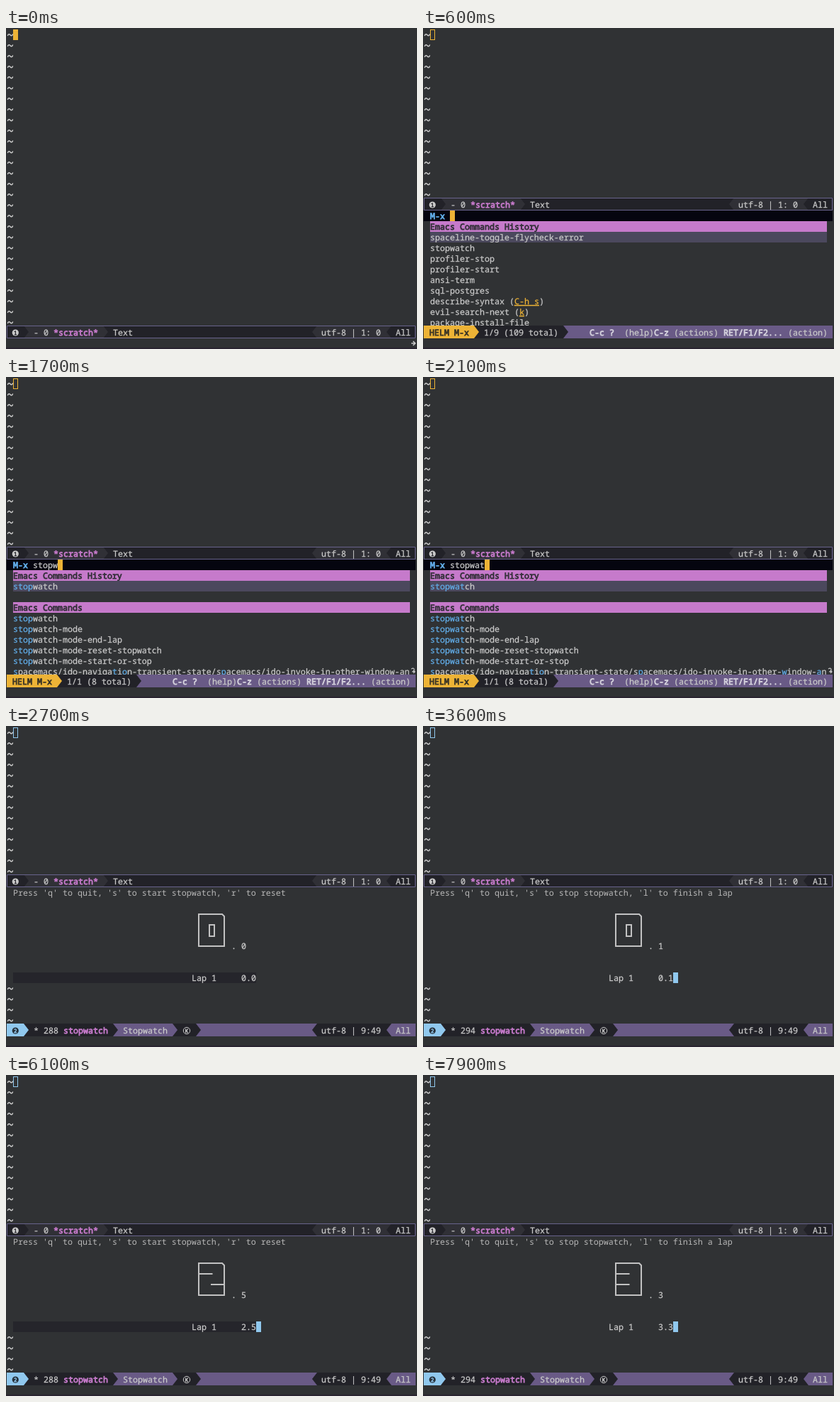
An HTML page for the animation above (8000 ms loop, 580 by 452 pixels).

```html
<!DOCTYPE html>
<html lang="en">
<head>
<meta charset="utf-8">
<title>Stopwatch in Emacs</title>
<style>
  html, body { margin: 0; width: 100%; height: 100%; overflow: hidden; background: #303234; }
  svg { display: block; width: 580px; height: 452px; }
  text {
    font: 11.6667px "Noto Sans Mono", "DejaVu Sans Mono", monospace;
    white-space: pre;
    text-rendering: geometricPrecision;
  }
</style>
</head>
<body>
<svg id="stage" viewBox="0 0 580 452"></svg>
<script>
const LOOP = 8000, COL = 7, ROW = 15;
const BG = '#303234', DARK = '#222228', MID = '#303036', PURPLE = '#695a86', EDGE = '#68638c';
const FG = '#cacaca', PINK = '#c67acb', YELLOW = '#edb336', BLUE = '#90c8ee', MATCH = '#62aeea';
const LIGHT = 0, REGULAR = .25, BOLD = .8; // stroke added around the glyphs

const stage = document.getElementById('stage');

// Basic shapes; text is placed by the centre line of its row.
const rect = (x, y, w, h, fill) => `<rect x="${x}" y="${y}" width="${w}" height="${h}" fill="${fill}"/>`;
const line = (d, color, width) => `<path d="${d}" fill="none" stroke="${color}" stroke-width="${width}"/>`;
const ink = color => `fill="${color}" stroke="${color}"`;
const text = (x, y, s, color = FG, weight = REGULAR) =>
  `<text x="${x}" y="${y + 4}" ${ink(color)} stroke-width="${weight}">${s}</text>`;
const small = (x, y, s, color) =>
  `<text x="${x}" y="${y + 2.7}" ${ink(color)} stroke-width=".5" text-anchor="middle" style="font-size:7.5px">${s}</text>`;

const badge = (y, n, fill, color) => `<circle cx="13.3" cy="${y}" r="4.6" fill="${fill}"/>` + small(13.3, y, n, color);
const strip = (x, y, w, color) => rect(x, y - 8, w, ROW, color);
const block = (x, y, color) => strip(x, y, COL, color);
const hollow = color => `<rect x="10.5" y="2.5" width="6" height="14" fill="none" stroke="${color}"/>`;

function tildes(from, to) {
  let d = '';
  for (let y = from; y <= to; y += ROW) d += `M2.3 ${y + 1}c1-3 2.5-2.6 3.7-1.2s2.7 1.6 3.7-1.3`;
  return line(d, FG, 1.4);
}

// A mode line: segments end in a tip at the given x.
function bar(y, base, left, right) {
  const a = y - 10, b = y + 8, mid = y - 1;
  const seg = ([tip, c]) => `<path d="M1 ${a}H${tip - 7}L${tip} ${mid}L${tip - 7} ${b}H1z" fill="${c}"/>`;
  const tail = ([tip, c]) => `<path d="M578 ${a}H${tip + 7}L${tip} ${mid}L${tip + 7} ${b}H578z" fill="${c}"/>`;
  return rect(1, a, 577, 18, base) + left.slice().reverse().map(seg).join('') + right.map(tail).join('');
}

const place = (y, pos) => text(445, y, 'utf-8 | ' + pos) + text(550, y, 'All');

function scratchBar(y) {
  return bar(y, DARK, [[32, DARK], [144, MID]], [[432, MID], [537, DARK]]) +
    line(`M1.5 ${y - 9.5}H577.5V${y + 7.5}H1.5z`, EDGE, 1) +
    badge(y, 1, FG, DARK) + text(39, y, '- 0') + text(67, y, '*scratch*', PINK, BOLD) +
    text(151, y, 'Text') + place(y, '1: 0');
}

// Candidate list
const history = [
  'spaceline-toggle-flycheck-error', 'stopwatch', 'profiler-stop', 'profiler-start', 'ansi-term',
  'sql-postgres', 'describe-syntax|C-h s', 'evil-search-next|k', 'package-install-file'
];
const commands = [
  'stopwatch', 'stopwatch-mode', 'stopwatch-mode-end-lap', 'stopwatch-mode-reset-stopwatch',
  'stopwatch-mode-start-or-stop',
  'spacemacs/ido-navigation-transient-state/spacemacs/ido-invoke-in-other-window-an'
];
const word = 'stopwatch';
const keyTimes = [900, 1100, 1300, 1500, 1700, 1850, 2000, 2200, 2300];
const typed = t => word.slice(0, keyTimes.filter(k => k <= t).length);

function fuzzy(s, query) {
  let i = 0;
  return [...s].map(c => c === query[i] ? (i++, `<tspan ${ink(MATCH)}>${c}</tspan>`) : c).join('');
}

function candidate(y, item, query) {
  const [name, key] = item.split('|');
  const hint = key ? ` (<tspan ${ink(YELLOW)} text-decoration="underline">${key}</tspan>)` : '';
  return text(10, y, fuzzy(name, query) + hint);
}

const header = (y, s) => strip(10, y, 560, PINK) + text(10, y, s, '#34303a', BOLD);

function helm(input, query) {
  const narrow = query.length > 2;
  const list = (y, items) => items.map((s, i) => candidate(y + i * ROW, s, query)).join('');
  let out = tildes(10, 235) + hollow(YELLOW) + scratchBar(249) +
    strip(1, 265, 577, '#05050f') + text(10, 265, 'M-x', MATCH, BOLD) + text(38, 265, input) +
    block(38 + COL * input.length, 265, YELLOW) +
    header(280, 'Emacs Commands History') + strip(10, 295, 560, '#4b485d');
  if (narrow) {
    out += list(295, ['stopwatch']) + header(325, 'Emacs Commands') + list(340, commands) +
      line('M572 411q4-2 4 1t-3 3h4M575 413l2 2-2 2', FG, 1.2);
  } else {
    out += list(295, history);
  }
  const count = narrow ? '1/1 (8 total)' : '1/9 (109 total)';
  const help = '#d6d3de';
  return out + bar(429, PURPLE, [[79, YELLOW], [100 + COL * count.length, DARK]], []) +
    text(9, 429, 'HELM M-x', '#3b3526', BOLD) + text(86, 429, count) +
    text(235, 429, 'C-c ?', help, BOLD) + text(284, 429, '(help)') +
    text(326, 429, 'C-z', help, BOLD) + text(354, 429, '(actions)') +
    text(424, 429, 'RET/F1/F2...', help, BOLD) + text(515, 429, '(action)');
}

// Big outlined digits
const frame = 'M272 265H305L308 268V310H272z';
const digits = [
  frame + 'M287 280H294V296H287z',
  'M279 265H298L301 268V295H308V310H279V295H287V280H279z',
  frame + 'M272 280H291.5M289 295H308',
  frame + 'M272 280H291.5M272 295H291.5'
];

function stopwatch(tenths, running, cursor) {
  const whole = Math.floor(tenths / 10), rest = tenths % 10;
  const note = running ? "'s' to stop stopwatch, 'l' to finish a lap" : "'s' to start stopwatch, 'r' to reset";
  return tildes(10, 205) + hollow(BLUE) + scratchBar(219) +
    text(10, 235, "Press 'q' to quit, " + note, '#b8b8b8', LIGHT) +
    line(digits[whole], '#c2c2c2', 2) + text(318, 310, '. ' + rest) +
    (running ? '' : strip(10, 355, 343, '#25252b')) +
    text(262, 355, 'Lap 1') + text(332, 355, `${whole}.${rest}`) + (cursor ? block(353, 355, BLUE) : '') +
    tildes(370, 415) +
    bar(429, PURPLE, [[32, BLUE], [158, DARK], [242, PURPLE], [275, DARK]], [[432, DARK], [537, PURPLE]]) +
    badge(429, 2, '#26303a', BLUE) + text(39, 429, running ? '* 294' : '* 288') +
    text(81, 429, 'stopwatch', PINK, BOLD) + text(165, 429, 'Stopwatch') +
    `<circle cx="255" cy="429" r="4.7" fill="none" stroke="${FG}"/>` + small(255, 429, 'K', FG) +
    place(429, '9:49');
}

const idle = () => tildes(10, 415) + block(10, 10, YELLOW) + scratchBar(429) +
  line('M572 444H577M574.5 441L577.5 444L574.5 447', FG, 1.6);

function scene(t) {
  if (t < 400) return idle();
  if (t < 2500) return helm(typed(t), typed(t - 100));
  const running = (t >= 3500 && t < 6000) || t >= 7100;
  const elapsed = Math.min(Math.max(t - 3500, 0), 2500) + Math.max(t - 7100, 0);
  return stopwatch(Math.floor(elapsed / 100), running, t >= 2800);
}

let last = -1;
function draw(now) {
  const t = Math.floor(now % LOOP / 50) * 50;
  if (t !== last) {
    last = t;
    stage.innerHTML = rect(0, 0, 580, 452, BG) + scene(t) + rect(0, 450, 580, 2, '#2a2430');
  }
  requestAnimationFrame(draw);
}
draw(performance.now());
</script>
</body>
</html>
```
